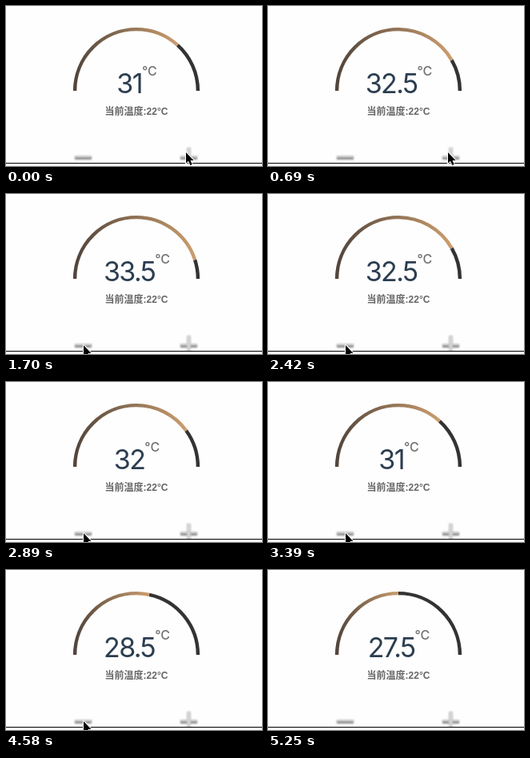
Animation, 320 px wide and 200 px high, one loop 6.21 s. Source, as an HTML page with a canvas:

```html
<!DOCTYPE html>
<html lang="zh-CN">
<head>
<meta charset="utf-8">
<title>Thermostat</title>
<style>
html, body { margin: 0; width: 100%; height: 100%; overflow: hidden; background: #fefefe; }
canvas { display: block; width: 320px; height: 200px; }
</style>
</head>
<body>
<canvas id="stage" width="320" height="200"></canvas>
<script>
const ctx = document.getElementById('stage').getContext('2d');
const LOOP = 6210;
const START = 31, MIN = 20, MAX = 35, STEP = 0.5;
const RAISE = [240, 450, 690, 930, 1110];
const LOWER = [2090, 2420, 2650, 3160, 3390, 3660, 3900, 4170, 4370, 4580, 4760, 4960];
const CX = 163, CY = 106, RADIUS = 76.9, WEIGHT = 4.4;
const PLUS = { x: 225, y: 183 }, MINUS = { x: 97, y: 189 };

const clicks = (times, t) => times.filter(at => at <= t).length;
const temperature = t => START + STEP * (clicks(RAISE, t) - clicks(LOWER, t));
const mix = (a, b, k) => a + (b - a) * k;
const between = (a, b, k) => ({ x: mix(a.x, b.x, k), y: mix(a.y, b.y, k) });

function cursorAt(t) {
  if (t < 1110) return PLUS;
  if (t < 1700) {
    const k = Math.floor((t - 1110) / 590 * 12) / 12;
    return between(PLUS, MINUS, k * k * (3 - 2 * k));
  }
  if (t < 5170) return MINUS;
  if (t < 5250) {
    const k = (Math.floor((t - 5170) / 80 * 3) + 1) / 3;
    return between(MINUS, { x: 235, y: 198 }, k);
  }
  return null;
}

function arc(from, to, color) {
  ctx.beginPath();
  ctx.arc(CX, CY, RADIUS, from, to);
  ctx.lineWidth = WEIGHT;
  ctx.strokeStyle = color;
  ctx.stroke();
}

function drawGauge(value) {
  const tip = Math.PI * (1 + (value - MIN) / (MAX - MIN));
  const left = CX - RADIUS;
  const fill = ctx.createLinearGradient(left, 0, CX + RADIUS * Math.cos(tip), 0);
  fill.addColorStop(0, '#52453c');
  fill.addColorStop(1, '#cb9d6e');
  arc(tip, Math.PI * 2, '#333');
  arc(Math.PI, tip, fill);
}

function text(str, x, y, font, color, spacing = '0px') {
  ctx.font = font;
  ctx.letterSpacing = spacing;
  ctx.fillStyle = color;
  ctx.fillText(str, x, y);
  return ctx.measureText(str).width;
}

function drawReading(value) {
  const bigFont = '400 34px Inter, sans-serif', tight = '-1.6px';
  const unitFont = '500 16px Inter, sans-serif';
  ctx.textAlign = 'left';
  ctx.font = unitFont;
  ctx.letterSpacing = '0px';
  const unitWidth = ctx.measureText('°C').width;
  ctx.font = bigFont;
  ctx.letterSpacing = tight;
  const x = 163.5 - (ctx.measureText(String(value)).width + unitWidth) / 2;
  const width = text(String(value), x, 108.5, bigFont, '#2c3e50', tight);
  text('°C', x + width, 87, unitFont, '#707070');

  ctx.textAlign = 'center';
  text('当前温度:22°C', 163, 136,
    'bold 12px "Liberation Sans", "Noto Sans CJK SC", sans-serif', '#666');
}

function softBar(x, y, w, h, color) {
  ctx.filter = 'blur(0.8px)';
  ctx.fillStyle = color;
  ctx.fillRect(x, y, w, h);
  ctx.filter = 'none';
}

function shadedBar(x) {
  softBar(x, 188.3, 21, 3.6, '#888');
  softBar(x, 187.3, 21, 1.7, '#d0d0d0');
}

function drawButtons() {
  shadedBar(86);
  shadedBar(218);
  softBar(226, 177, 5, 20, '#c4c4c4');
  softBar(227.7, 177, 1.6, 19, '#e4e4e4');
  ctx.fillStyle = '#000';
  ctx.fillRect(0, 196, 320, 1);
  ctx.fillStyle = '#fefefe';
  ctx.fillRect(0, 197, 320, 3);
}

function drawCursor({ x, y }) {
  const arrow = new Path2D('M0 0V13.6L3 10.7L5.3 16L7.8 14.9L5.5 9.9H9.6Z');
  ctx.save();
  ctx.translate(x, y);
  ctx.lineWidth = 2;
  ctx.lineJoin = 'round';
  ctx.strokeStyle = '#fff';
  ctx.stroke(arrow);
  ctx.fillStyle = '#000';
  ctx.fill(arrow);
  ctx.restore();
}

function draw(t) {
  ctx.fillStyle = '#fefefe';
  ctx.fillRect(0, 0, 320, 200);
  const value = temperature(t), cursor = cursorAt(t);
  drawGauge(value);
  drawReading(value);
  drawButtons();
  if (cursor) drawCursor(cursor);
}

const begin = performance.now();
function tick() {
  draw((performance.now() - begin) % LOOP);
  requestAnimationFrame(tick);
}
tick();
</script>
</body>
</html>
```
